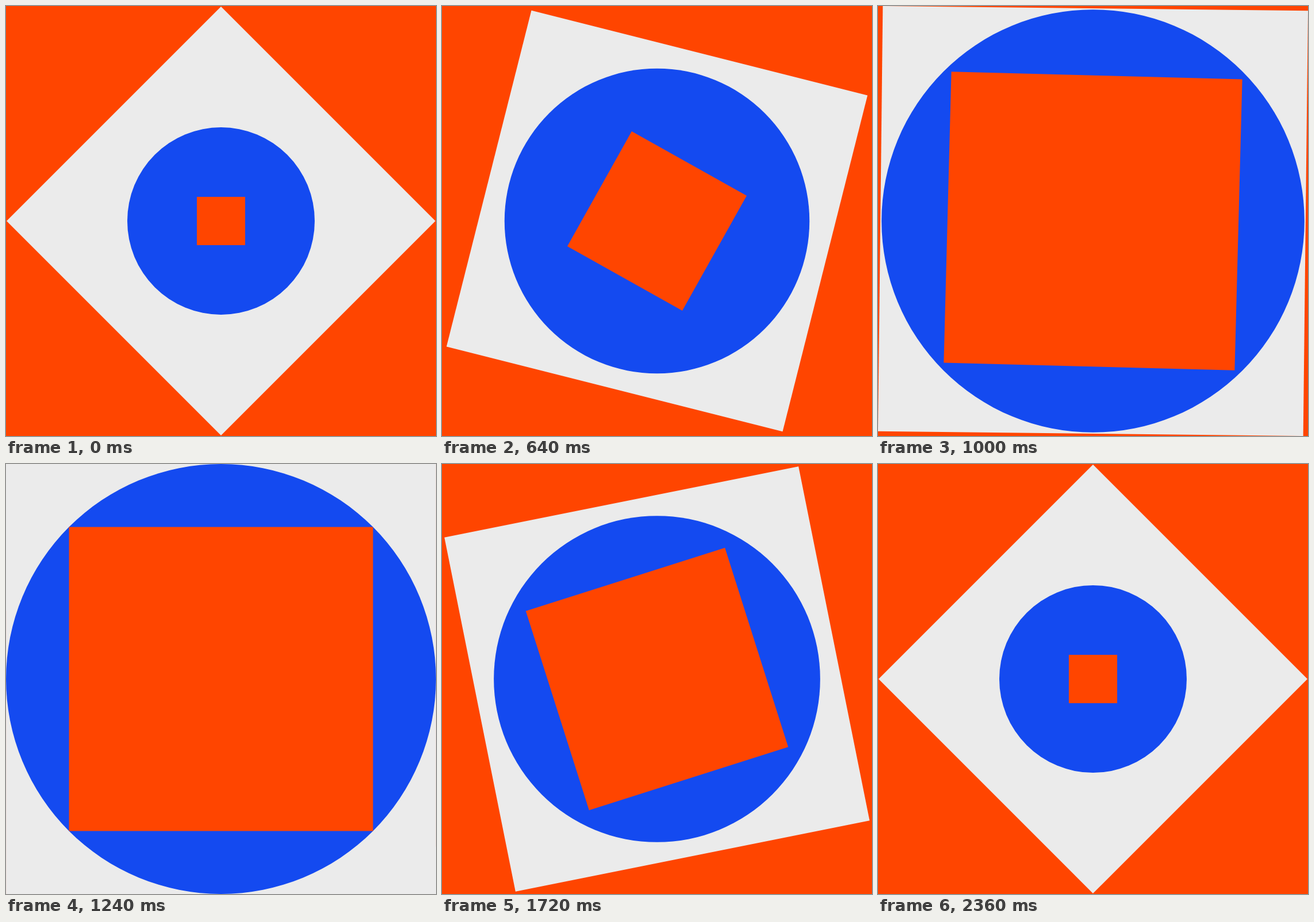
An HTML page with a canvas for the animation above (2400 ms loop, 748 by 748 pixels).

```html
<!DOCTYPE html>
<html lang="en">
<head>
<meta charset="utf-8">
<style>
  html, body { margin: 0; width: 100%; height: 100%; overflow: hidden; background: #ff4500; }
  canvas { display: block; }
</style>
</head>
<body>
<canvas id="stage" width="748" height="748"></canvas>
<script>
const SIZE = 748, LOOP = 2400, HALF = LOOP / 2, STEP = 40;
const ORANGE = '#ff4500', GREY = '#ebebeb', BLUE = '#144af0';
const ctx = document.getElementById('stage').getContext('2d');

// Power curve that levels off at 1; a higher knee gives a sharper bend.
function ease(x, gain, power, knee) {
  const z = gain * Math.abs(x) ** power;
  return z / (1 + z ** knee) ** (1 / knee);
}

function square(side, angle, color) {
  ctx.save();
  ctx.rotate(angle);
  ctx.fillStyle = color;
  ctx.fillRect(-side / 2, -side / 2, side, side);
  ctx.restore();
}

function draw(t) {
  // Signed distance from the fullest pose; the inner square lags behind.
  const from = delay => (HALF + delay - t) / HALF;
  const outer = from(0), innerSpin = from(24), innerSize = from(62);

  const turn = ease(outer, 3.1, 3, 7);
  const innerTurn = ease(innerSpin, 3.03, 3.1, 12);
  const side = SIZE * (1 - .2948 * ease(outer, 5.7, 2.8, 5));
  const radius = side / 2 * (1 - .382 * turn);
  const innerSide = side * (Math.SQRT1_2 - .5479 * ease(innerSize, 4.65, 3.1, 5));

  ctx.setTransform(1, 0, 0, 1, SIZE / 2, SIZE / 2);
  square(SIZE, 0, ORANGE);
  square(side, Math.PI / 4 * turn * Math.sign(outer), GREY);
  ctx.fillStyle = BLUE;
  ctx.beginPath();
  ctx.arc(0, 0, radius, 0, 2 * Math.PI);
  ctx.fill();
  square(innerSide, Math.PI / 2 * innerTurn * Math.sign(innerSpin), ORANGE);
}

function tick() {
  draw(Math.floor(performance.now() % LOOP / STEP) * STEP);
  requestAnimationFrame(tick);
}
tick();
</script>
</body>
</html>
```
